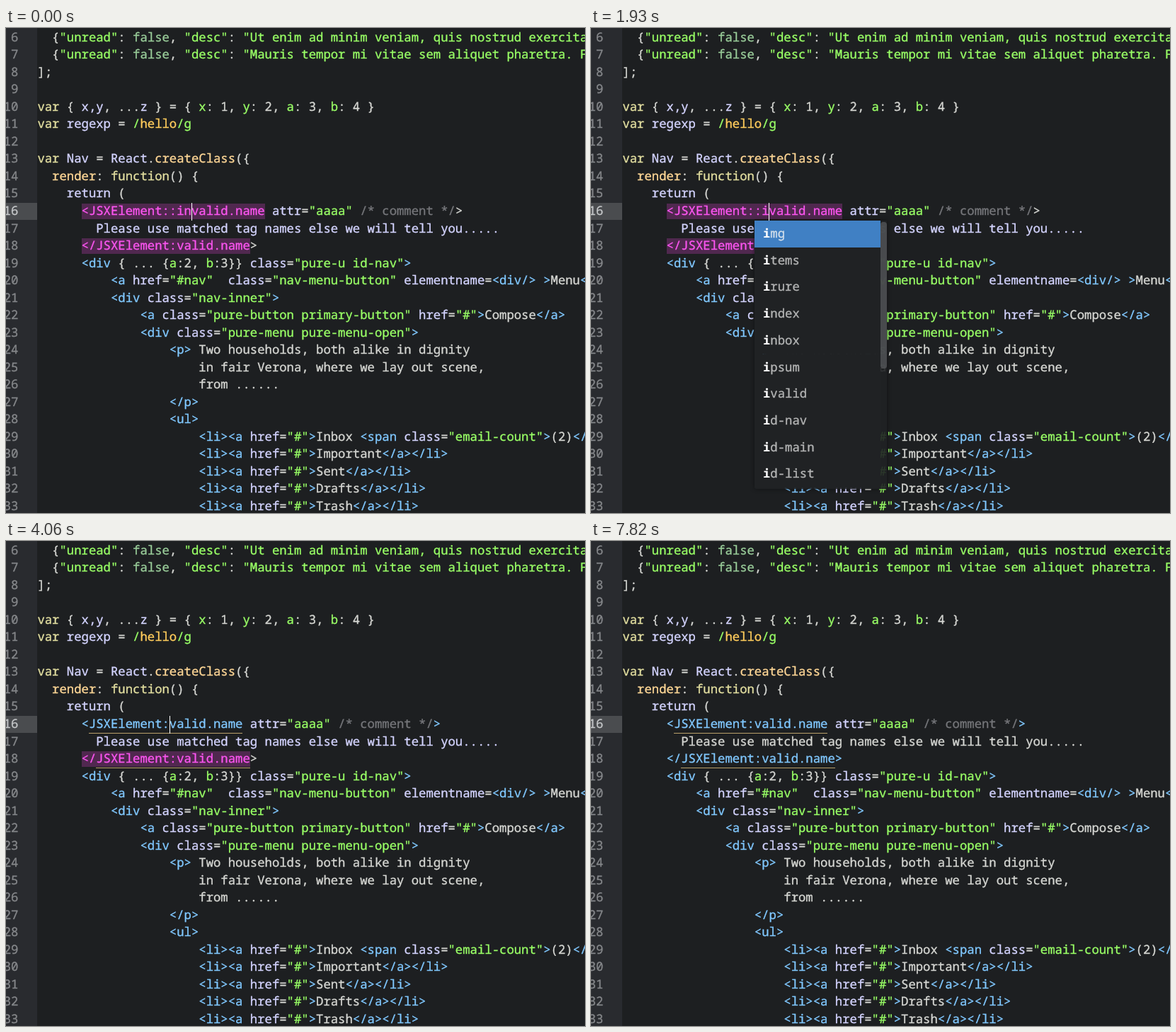
An HTML page that plays this animation: 818 by 685 pixels, repeating every 8000 ms.

```html
<!DOCTYPE html>
<html lang="en">
<head>
<meta charset="utf-8">
<title>JSX editing</title>
<style>
  html, body { margin: 0; width: 100%; height: 100%; overflow: hidden; background: #1d1f21; }
  #stage {
    position: relative; width: 818px; height: 685px; overflow: hidden;
    background: #1d1f21; color: #d6d7d3;
    font: 17.28px/24.52px "Noto Sans Mono", "DejaVu Sans Mono", monospace;
    font-variant-ligatures: none; text-rendering: geometricPrecision; white-space: pre;
    -webkit-text-stroke: .35px currentColor;
  }
  #stage > *, #popup > * { position: absolute; }
  #gutter { left: 0; top: 0; width: 44px; height: 685px; background: #292b2f; }
  #active { left: 0; top: 247px; width: 44px; height: 24px; background: #4a4c4f; }
  .num { right: 800.6px; color: #85878a; }
  .num.on { color: #c4c6c8; }
  .row { left: 44.4px; }
  .k { color: #e3dfa0; } .v { color: #d4d4ff; } .f { color: #ffd796; }
  .s { color: #99ff66; } .b { color: #99cc99; } .t { color: #80c8ff; }
  .c { color: #75767a; } .o { color: #ffcc5c; } .p { color: #d6d7d3; }
  .m, .M, .u { display: inline-block; }
  .m, .M { color: #fb55f0; background: linear-gradient(#50284f, #50284f) 0 1px / 100% 22px no-repeat; }
  .u { color: #80c8ff; }
  .u, .M { box-shadow: inset 0 -1px #b9a06a; }
  #caret { top: 247px; width: 1px; height: 25px; background: #fff; }
  #popup {
    left: 231px; top: 272px; width: 187px; height: 379px; overflow: hidden;
    background: rgba(32, 34, 36, .9); border-radius: 0 0 3px 3px; box-shadow: 0 0 6px rgba(0, 0, 0, .45);
  }
  .item {
    left: 0; width: 166px; height: 37.7px; padding-left: 12px;
    line-height: 37.7px; color: #b4b5b5; background: #202224;
  }
  .item:first-child { background: #4080c4; color: #d3dfeb; }
  .item b { color: #fff; -webkit-text-stroke: 0; }
  #thumb { left: 178px; top: 2px; width: 9px; height: 207px; border-radius: 4px; background: rgba(86, 88, 91, .75); }
</style>
</head>
<body>
<div id="stage"></div>
<script>
const LOOP = 8000, CHAR = 10.368, LINE = 24.52, LEFT = 44.4, FIRST = 6;
const stage = document.getElementById('stage');

// A backtick plus a letter switches the colour class.
const li = (label, rest = '</a></li>') =>
  ' '.repeat(22) + '`t<li><a `vhref`p=`s"#"`t>`p' + label + '`t' + rest;

const code = [
  '  `p{`s"unread"`p: `bfalse`p, `s"desc"`p: `s"Ut enim ad minim veniam, quis nostrud exercitation',
  '  `p{`s"unread"`p: `bfalse`p, `s"desc"`p: `s"Mauris tempor mi vitae sem aliquet pharetra. Fusce',
  '`p];',
  '',
  '`kvar `p{ `vx,y`p, ...`vz `p} = { `sx`p: 1, `sy`p: 2, `sa`p: 3, `sb`p: 4 }',
  '`kvar `vregexp `p= `s/`ohello`s/g',
  '',
  '`kvar `vNav `p= `vReact`p.`fcreateClass`p({',
  '  `frender`p: `kfunction`p() {',
  '    `vreturn `p(',
  '',
  '',
  '',
  '      `t<div `p{ ... {`sa`p:2, `sb`p:3}} `vclass`p=`s"pure-u id-nav"`t>',
  '          `t<a `vhref`p=`s"#nav"  `vclass`p=`s"nav-menu-button" `velementname`p=`t<div/> >`pMenu`t</a>',
  '          `t<div `vclass`p=`s"nav-inner"`t>',
  '              `t<a `vclass`p=`s"pure-button primary-button" `vhref`p=`s"#"`t>`pCompose`t</a>',
  '              `t<div `vclass`p=`s"pure-menu pure-menu-open"`t>',
  '                  `t<p> `pTwo households, both alike in dignity',
  '                      `pin fair Verona, where we lay out scene,',
  '                      `pfrom ......',
  '                  `t</p>',
  '                  `t<ul>',
  li('Inbox `t<span `vclass`p=`s"email-count"`t>`p(2)', '</span></a></li>'),
  li('Important'), li('Sent'), li('Drafts'), li('Trash')
];

// Step tables: [start time, value]
const typed = [[0, '::in'], [1810, '::i'], [3200, '::'], [4060, ':']];
const checked = [[0, false], [4180, true]];
const popupOn = [[0, false], [1930, true], [3200, false]];
const pointerAt = [[0, null], [7120, [697, 225]], [7240, null], [7520, [803, 649]], [7670, null]];
const blinks = [130, 560, 1010, 1420, 2360, 2770, 3630, 4060, 4590, 5020, 5420, 5850, 6130, 6570, 7000, 7390, 7820];

const at = (table, t) => table.filter(step => step[0] <= t).pop()[1];

function add(parent, cls, id) {
  const el = document.createElement('div');
  if (cls) el.className = cls;
  if (id) el.id = id;
  return parent.appendChild(el);
}

function paint(el, text) {
  el.textContent = '';
  text.split('`').forEach((part, i) => {
    if (!i) return el.append(part);
    const span = document.createElement('span');
    span.className = part[0];
    span.textContent = part.slice(1);
    el.append(span);
  });
}

add(stage, '', 'gutter');
add(stage, '', 'active');
const rows = code.map((text, i) => {
  const top = (1.8 + i * LINE) + 'px';
  const num = add(stage, i === 10 ? 'num on' : 'num');
  const row = add(stage, 'row');
  num.textContent = i + FIRST;
  num.style.top = row.style.top = top;
  paint(row, text);
  return row;
});

const popup = add(stage, '', 'popup');
['img', 'items', 'irure', 'index', 'inbox', 'ipsum', 'ivalid', 'id-nav', 'id-main', 'id-list'].forEach((word, i) => {
  const item = add(popup, 'item');
  item.style.top = i * 37.7 + 'px';
  item.innerHTML = '<b>' + word[0] + '</b>' + word.slice(1);
});
add(popup, '', 'thumb');

const caret = add(stage, '', 'caret');
const pointer = add(stage);
pointer.innerHTML = '<svg width="11" height="18" style="display:block" fill="none" stroke="#fff">' +
  '<path d="M2 .5h2.5l1 1 1-1H9M5.5 1.5v15M2 17.5h2.5l1-1 1 1H9"/></svg>';

function showTag(part, done) {
  const valid = part === ':';
  paint(rows[10], '      ' +
    (valid ? '`t<`uJSXElement:valid.name' : '`m<JSXElement' + part + 'valid.name') +
    '`v attr`p=`s"aaaa" `c/* comment */' + (valid ? '`t>' : '`p>'));
  paint(rows[11], '        ' + (done ? '`p' : '`v') + 'Please use matched tag names else we will tell you.....');
  paint(rows[12], '      ' +
    (done ? '`t</`uJSXElement:valid.name`t>'
      : valid ? '`m</`MJSXElement:valid.name`p>'
      : '`m</JSXElement:valid.name`p>'));
  caret.style.left = Math.floor(LEFT + CHAR * (17 + part.length)) + 'px';
}

let shown = '';
function draw(now) {
  const t = now % LOOP;
  const part = at(typed, t), done = at(checked, t), pos = at(pointerAt, t);
  if (shown !== part + done) {
    showTag(part, done);
    shown = part + done;
  }
  caret.style.visibility = blinks.filter(b => b <= t).length % 2 ? 'hidden' : 'visible';
  popup.style.visibility = at(popupOn, t) ? 'visible' : 'hidden';
  pointer.style.visibility = pos ? 'visible' : 'hidden';
  if (pos) [pointer.style.left, pointer.style.top] = pos.map(v => v + 'px');
}

const start = performance.now();
function tick() {
  draw(performance.now() - start);
  requestAnimationFrame(tick);
}
tick();
</script>
</body>
</html>
```
